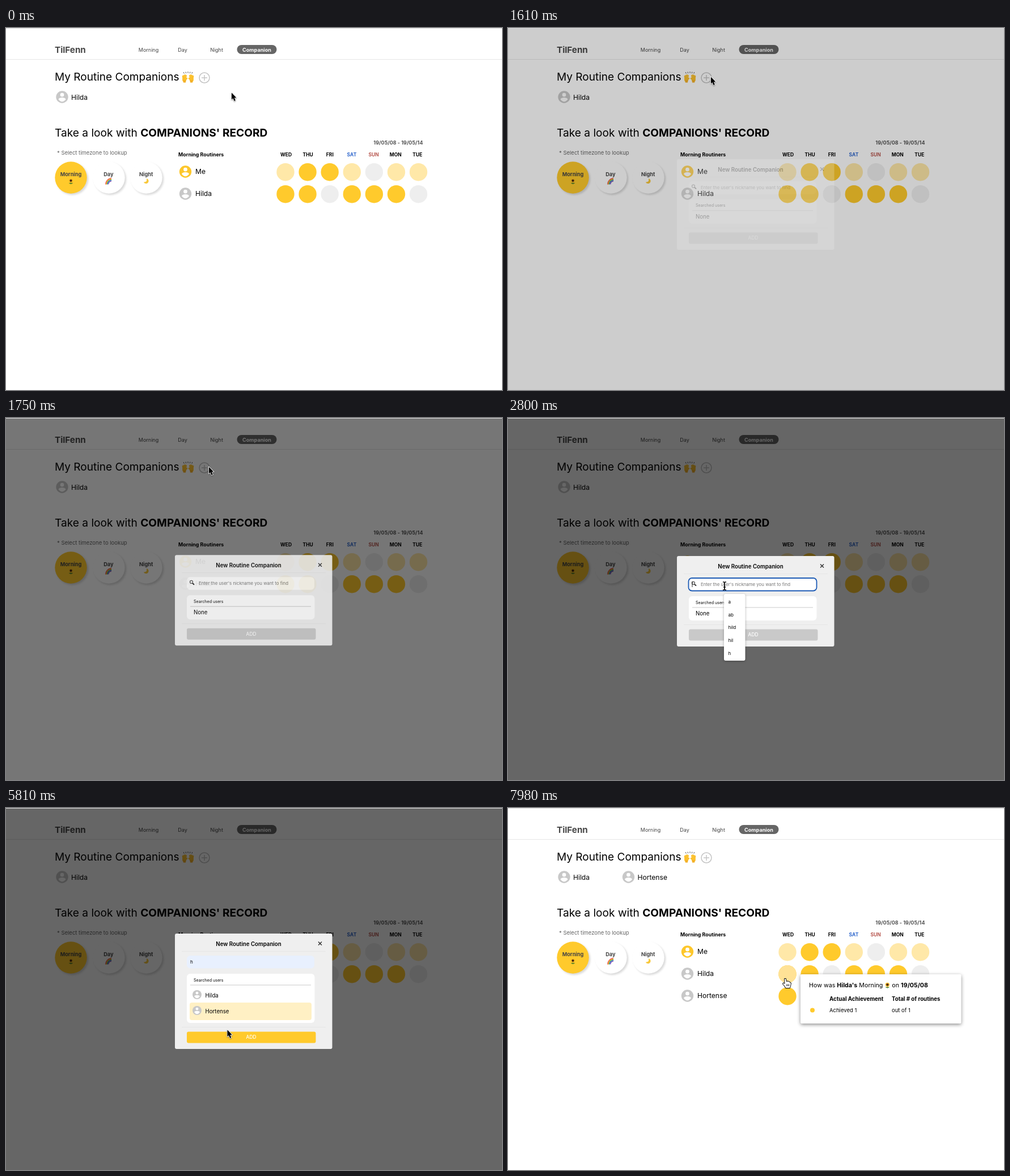
Recreate the animation shown at these times as an HTML page with a canvas. Size 875 by 640 pixels, loop 8000 ms.

```html
<!DOCTYPE html>
<html lang="en">
<head>
<meta charset="utf-8">
<title>Routine companions</title>
<style>
  html, body { margin: 0; width: 100%; height: 100%; overflow: hidden; background: #fff; }
  canvas { display: block; }
</style>
</head>
<body>
<canvas id="stage" width="875" height="640"></canvas>
<script>
const screenCtx = document.getElementById('stage').getContext('2d');
const layer = document.createElement('canvas');
layer.width = 875;
layer.height = 640;
const layerCtx = layer.getContext('2d');
let ctx = screenCtx;

const LOOP = 8000, STEP = 70, TAU = Math.PI * 2;
const GOLD = '#ffca2c', PALE = '#ffe8a8', EMPTY = '#eeeeee', HOVERED = '#ffe296';
const LEVELS = { g: GOLD, p: PALE, e: EMPTY };
const FIRST = 'Hilda', SECOND = 'Hortense';
const SUGGESTIONS = ['a', 'ab', 'hild', 'hil', 'h'];

// Pointer stops: time, x, y
const PATH = [
  [0, 398, 114], [630, 398, 114], [1190, 358, 86], [1820, 358, 86],
  [2310, 382, 291], [2380, 382, 291], [2450, 382, 297], [3150, 382, 297],
  [3780, 388, 412], [4130, 388, 412], [4410, 394, 376], [4690, 372, 357],
  [5390, 372, 357], [6020, 397, 404], [6650, 397, 404], [7490, 489, 302], [LOOP, 489, 302]
];

const clamp = v => Math.max(0, Math.min(1, v));
const smooth = v => v * v * (3 - 2 * v);

// CSS "ease": cubic-bezier(.25, .1, .25, 1)
function ease(x) {
  const curve = (a, b, u) => 3 * a * u * (1 - u) ** 2 + 3 * b * u * u * (1 - u) + u ** 3;
  let low = 0, high = 1;
  for (let i = 0; i < 20; i++) {
    const mid = (low + high) / 2;
    if (curve(.25, .25, mid) < x) low = mid; else high = mid;
  }
  return curve(.1, 1, low);
}

function pointerAt(t) {
  const i = PATH.findIndex((p, k) => k && t <= p[0]);
  const [t0, x0, y0] = PATH[i - 1], [t1, x1, y1] = PATH[i];
  const u = smooth((t - t0) / (t1 - t0));
  return [x0 + (x1 - x0) * u, y0 + (y1 - y0) * u];
}

// Draws a group as one picture, then blends it in with a single opacity.
function group(alpha, draw) {
  layerCtx.clearRect(0, 0, 875, 640);
  ctx = layerCtx;
  draw();
  ctx = screenCtx;
  ctx.globalAlpha = alpha;
  ctx.drawImage(layer, 0, 0);
  ctx.globalAlpha = 1;
}

function text(str, x, cy, size, color = '#000', weight = 400, align = 'left') {
  ctx.font = `${weight} ${size}px Inter, "Open Sans", sans-serif`;
  ctx.textAlign = align;
  ctx.fillStyle = color;
  ctx.fillText(str, x, cy + size * .36);
  return x + ctx.measureText(str).width;
}

function disc(x, y, r, color) {
  ctx.fillStyle = color;
  ctx.beginPath();
  ctx.arc(x, y, r, 0, TAU);
  ctx.fill();
}

function box(x, y, w, h, r, color) {
  ctx.fillStyle = color;
  ctx.beginPath();
  ctx.roundRect(x, y, w, h, r);
  ctx.fill();
}

function line(color, width, ...points) {
  ctx.strokeStyle = color;
  ctx.lineWidth = width;
  ctx.beginPath();
  points.forEach(([x, y]) => ctx.lineTo(x, y));
  ctx.stroke();
}

function at(x, y, draw) {
  ctx.save();
  ctx.translate(x, y);
  draw();
  ctx.restore();
}

function shadow(color, blur, dx, dy) {
  ctx.shadowColor = color;
  ctx.shadowBlur = blur;
  ctx.shadowOffsetX = dx;
  ctx.shadowOffsetY = dy;
}

function avatar(x, y, r, color = '#c8c8c8') {
  at(x, y, () => {
    disc(0, 0, r, color);
    disc(0, -r * .36, r * .31, '#fff');
    ctx.beginPath();
    ctx.moveTo(-r * .6, r * .4);
    ctx.bezierCurveTo(-r * .55, 0, r * .55, 0, r * .6, r * .4);
    ctx.quadraticCurveTo(0, r * 1.15, -r * .6, r * .4);
    ctx.fill();
  });
}

function sunflower(x, y) {
  at(x, y, () => {
    line('#4b7d25', 1, [0, 0], [0, 4.5]);
    line('#4b7d25', 1.3, [-3, 3.2], [0, 4.3], [3, 3.2]);
    for (let i = 0; i < 10; i++) {
      const a = i * TAU / 10;
      disc(Math.cos(a) * 2.7, Math.sin(a) * 2.7 - 1.2, 1.1, '#fbb91f');
    }
    disc(0, -1.2, 2.1, '#4a2812');
  });
}

function rainbow(x, y) {
  ctx.lineWidth = 1.4;
  ['#e8483b', '#f6b82e', '#4fae57', '#3d7fd8', '#8658b8'].forEach((color, i) => {
    ctx.strokeStyle = color;
    ctx.beginPath();
    ctx.arc(x + 5, y + 5, 10 - i * 1.2, Math.PI * .98, Math.PI * 1.5);
    ctx.stroke();
  });
}

function moon(x, y) {
  at(x, y, () => {
    ctx.fillStyle = '#f8c83c';
    ctx.beginPath();
    ctx.arc(0, 0, 4.6, -1.4, 2.7);
    ctx.quadraticCurveTo(2.8, 2.2, .8, -4.5);
    ctx.fill();
  });
}

function raisedHands(x, y) {
  at(x, y, () => {
    ctx.lineCap = 'round';
    for (const side of [-1, 1]) {
      ctx.save();
      ctx.scale(side, 1);
      for (let i = 0; i < 4; i++) {
        line('#fbc02d', 2.2, [4.2 + i * 1.4, 3], [3.2 + i * 2, -5 + Math.abs(i - 1) * .9]);
      }
      line('#fbc02d', 2.2, [5, 4.5], [1.8, 1]);
      box(3, 0, 6.8, 6.5, 2.6, '#fbc02d');
      box(3.8, 4, 4.6, 4.6, 1.2, '#f3b028');
      ctx.restore();
    }
    for (let i = -2; i <= 2; i++) {
      line('#555', 1, [i * 3.4, -8.5 + Math.abs(i) * .4], [i * 3.8, -10.6 + Math.abs(i) * .5]);
    }
  });
}

function drawPage(joined, hover) {
  ctx.fillStyle = '#fff';
  ctx.fillRect(0, 0, 875, 640);
  ctx.fillStyle = '#e6e6e6';
  ctx.fillRect(0, 55, 875, 1);

  text('TilFenn', 86, 38.5, 15.2, '#484848', 700);
  [['Morning', 251.5], ['Day', 311.5], ['Night', 371.5]]
    .forEach(([label, x]) => text(label, x, 38.5, 9, '#444', 400, 'center'));
  box(407.5, 30, 70, 16, 8, '#666');
  text('Companion', 442.5, 38.5, 9.1, '#fff', 700, 'center');

  text('My Routine Companions', 86, 86.5, 19.05);
  raisedHands(321, 88);
  ctx.strokeStyle = '#c4c4c4';
  ctx.lineWidth = 1.5;
  ctx.beginPath();
  ctx.arc(350, 88, 9, 0, TAU);
  ctx.stroke();
  line('#c4c4c4', 1.5, [345, 88], [355, 88]);
  line('#c4c4c4', 1.5, [350, 83], [350, 93]);
  avatar(99, 122, 10.7);
  text(FIRST, 115, 122.5, 12.1);
  if (joined) {
    avatar(212.5, 122, 10.7);
    text(SECOND, 228.5, 122.5, 12.1);
  }

  const end = text('Take a look with ', 86, 185.5, 19.15);
  text("COMPANIONS' RECORD", end, 185.5, 19.15, '#000', 700);
  text('19/05/08 - 19/05/14', 735.5, 202.5, 9, '#555', 700, 'right');
  text('* Select timezone to lookup', 90, 221, 9.5, '#666');
  text('Morning Routiners', 304, 224, 8.9, '#000', 700);

  [[114.5, GOLD], [181.5, '#fff'], [247.5, '#fff']].forEach(([x, color]) => {
    ctx.save();
    shadow('rgba(0,0,0,.15)', 3.5, 2.5, 2.5);
    disc(x, 264.5, 28.2, color);
    ctx.restore();
  });
  ['Morning', 'Day', 'Night'].forEach((label, i) => {
    text(label, 114.5 + i * 66.3, 259, 9.2, '#444', 700, 'center');
  });
  sunflower(114.5, 271);
  rainbow(181, 271);
  moon(247, 270.5);

  const names = ['Me', FIRST, SECOND].slice(0, joined ? 3 : 2);
  names.forEach((name, i) => {
    avatar(316.5, 254 + i * 39, 10.7, i ? '#c8c8c8' : '#fdc72b');
    text(name, 334, 254 + i * 39, 12.1);
  });
  ['WED', 'THU', 'FRI', 'SAT', 'SUN', 'MON', 'TUE'].forEach((day, i) => {
    const color = { SAT: '#3068cd', SUN: '#b85850' }[day] || '#000';
    text(day, 494 + i * 38.65, 224, 8.5, color, 700, 'center');
  });
  ['pggpepp', 'ggeggge', 'gpppppp'].slice(0, names.length).forEach((row, j) => {
    [...row].forEach((level, i) => disc(493 + i * 39.1, 254.7 + j * 39, 15.7, LEVELS[level]));
  });
  ctx.globalAlpha = hover;
  disc(493, 293.7, 15.7, HOVERED);
  ctx.globalAlpha = 1;
}

function magnifier(x, y) {
  ctx.strokeStyle = '#555';
  ctx.lineWidth = 1.2;
  ctx.beginPath();
  ctx.arc(x - 1, y - 1.2, 2.5, 0, TAU);
  ctx.stroke();
  line('#222', 1.8, [x + 1, y + .8], [x + 4, y + 3.6]);
}

function drawDialog(t, value) {
  const found = t >= 4060, focused = t >= 2660 && t < 5040, picked = t >= 5180;
  const grow = found ? 44 : 0;

  box(298, 0, 277.5, 160 + grow, 3, '#efefef');
  text('New Routine Companion', 428, 18.5, 9.7, '#000', 600, 'center');
  line('#333', 1.5, [551, 14.5], [557, 20.5]);
  line('#333', 1.5, [557, 14.5], [551, 20.5]);
  line('#e6e6e6', 1, [310, 31.5], [564, 31.5]);

  box(319, 39, 225, 22.5, 6, value ? '#e8f0fe' : '#fff');
  if (focused) {
    ctx.strokeStyle = '#1d5bb5';
    ctx.lineWidth = 1.8;
    ctx.beginPath();
    ctx.roundRect(318.5, 39, 226, 22.5, 6);
    ctx.stroke();
  }
  let caret = 325;
  if (value) {
    caret = text(value, 325, 50, 8.1) + .5;
  } else {
    magnifier(328, 49);
    text("Enter the user's nickname you want to find", 340, 50, 7.83, '#777');
  }
  if (focused) line('#000', .8, [caret, 45], [caret, 55]);

  box(319, 71, 225.5, 43 + grow, 6, '#fff');
  text('Searched users', 331, 82, 7.1);
  line('#c9c9c9', 1, [325, 91], [538, 91]);
  if (found) {
    if (picked) box(324, 122, 215, 31, 4, '#fff0c4');
    [FIRST, SECOND].forEach((name, i) => {
      avatar(337, 108 + i * 28, 8);
      text(name, 351.5, 109.5 + i * 28, 9.7);
    });
  } else {
    text('None', 331, 101.5, 9.7);
  }
  line('#e6e6e6', 1, [310, 121.5 + grow], [564, 121.5 + grow]);
  box(319, 129.5 + grow, 227.5, 20, 3, picked ? GOLD : '#c9c9c9');
  text('ADD', 432.5, 139.5 + grow, 8.3, '#fff', 500, 'center');
}

function drawSuggestions(hovered) {
  ctx.save();
  shadow('rgba(0,0,0,.3)', 4, 0, 1);
  box(381, 311, 37.5, 118, 3, '#fff');
  ctx.restore();
  SUGGESTIONS.forEach((word, i) => {
    const y = 325 + i * 22.65;
    if (i === hovered) {
      ctx.fillStyle = '#e8e8e8';
      ctx.fillRect(381, y - 11.3, 37.5, 22.65);
    }
    text(word, 388.5, y, 8.1);
  });
}

function drawModal(t, show, pointerY) {
  const found = t >= 4060, open = t >= 2730 && !found;
  const hovered = open ? Math.floor((pointerY - 313.5) / 22.65) : -1;
  const value = found ? 'h' : SUGGESTIONS[hovered] || '';
  const top = (found ? 222 : 244) - 18 * (1 - show);

  ctx.fillStyle = `rgba(0,0,0,${show * .6})`;
  ctx.fillRect(0, 0, 875, 640);
  group(show ** 1.3, () => at(0, top, () => drawDialog(t, value)));
  if (open) drawSuggestions(hovered);
}

function drawTooltip() {
  ctx.save();
  shadow('rgba(0,0,0,.45)', 6, 0, 2);
  box(516, 294, 283.5, 87, 2, '#fff');
  ctx.restore();
  let x = text('How was ', 531, 313, 10.7);
  x = text(`${FIRST}'s`, x, 313, 10.7, '#000', 700);
  x = text(' Morning ', x, 313, 10.7);
  sunflower(x + 5, 313.5);
  x = text(' on ', x + 10, 313, 10.7);
  text('19/05/08', x, 313, 10.7, '#000', 700);
  text('Actual Achievement', 567, 337.5, 9.7, '#000', 700);
  text('Total # of routines', 677, 337.5, 9.7, '#000', 700);
  disc(537, 357.5, 4, GOLD);
  text('Achieved 1', 567, 357.5, 9.5);
  text('out of 1', 677, 357.5, 9.5);
}

function outlined(points, fill, stroke) {
  ctx.beginPath();
  points.forEach(([x, y]) => ctx.lineTo(x, y));
  ctx.closePath();
  ctx.lineJoin = 'round';
  ctx.lineWidth = 1.8;
  ctx.strokeStyle = stroke;
  ctx.stroke();
  ctx.fillStyle = fill;
  ctx.fill();
}

function drawArrow() {
  shadow('rgba(0,0,0,.3)', 2, 0, 1);
  outlined([[0, .5], [0, 12.3], [2.6, 9.9], [4.7, 15], [6.8, 14.1], [4.7, 9.2], [8.3, 9.2]], '#000', '#fff');
}

function drawBeam() {
  line('#111', 1.4, [-3, -7], [-1, -7], [0, -6], [0, 6], [-1, 7], [-3, 7]);
  line('#111', 1.4, [3, -7], [1, -7], [0, -6], [0, 6], [1, 7], [3, 7]);
  line('#111', 1.4, [-2, 2], [2, 2]);
}

function drawHand() {
  outlined([[-1, 0], [1, 0], [2, 5], [5, 4.5], [8, 6], [10, 8], [9, 13], [8, 16], [1, 16],
    [-1, 12.5], [-4, 9], [-3.2, 7.4], [-.5, 9]], '#fff', '#000');
  for (let x = 2; x < 8; x += 2) line('#000', .8, [x + .6, 9.5], [x + .6, 13]);
}

function render(time) {
  const t = Math.floor((time % LOOP) / STEP) * STEP;
  const [x, y] = pointerAt(t);
  const show = t < 6160 ? ease(clamp((t - 1536) / 345)) : t < 6230 ? .45 : 0;
  const hover = clamp((t - 7350) / 140);
  const tip = clamp((t - 7420) / 180);

  drawPage(t >= 6230, hover);
  if (show > 0) drawModal(t, show, y);
  if (tip > 0) group(tip, drawTooltip);
  ctx.fillStyle = '#dadada';
  ctx.fillRect(0, 0, 875, 1);

  const overInput = t >= 2310 && y > 283 && y < 306 && t < 4060;
  at(x, y, t >= 7490 ? drawHand : overInput ? drawBeam : drawArrow);
}

const start = performance.now();
function loop() {
  render(performance.now() - start);
  requestAnimationFrame(loop);
}
loop();
</script>
</body>
</html>
```
